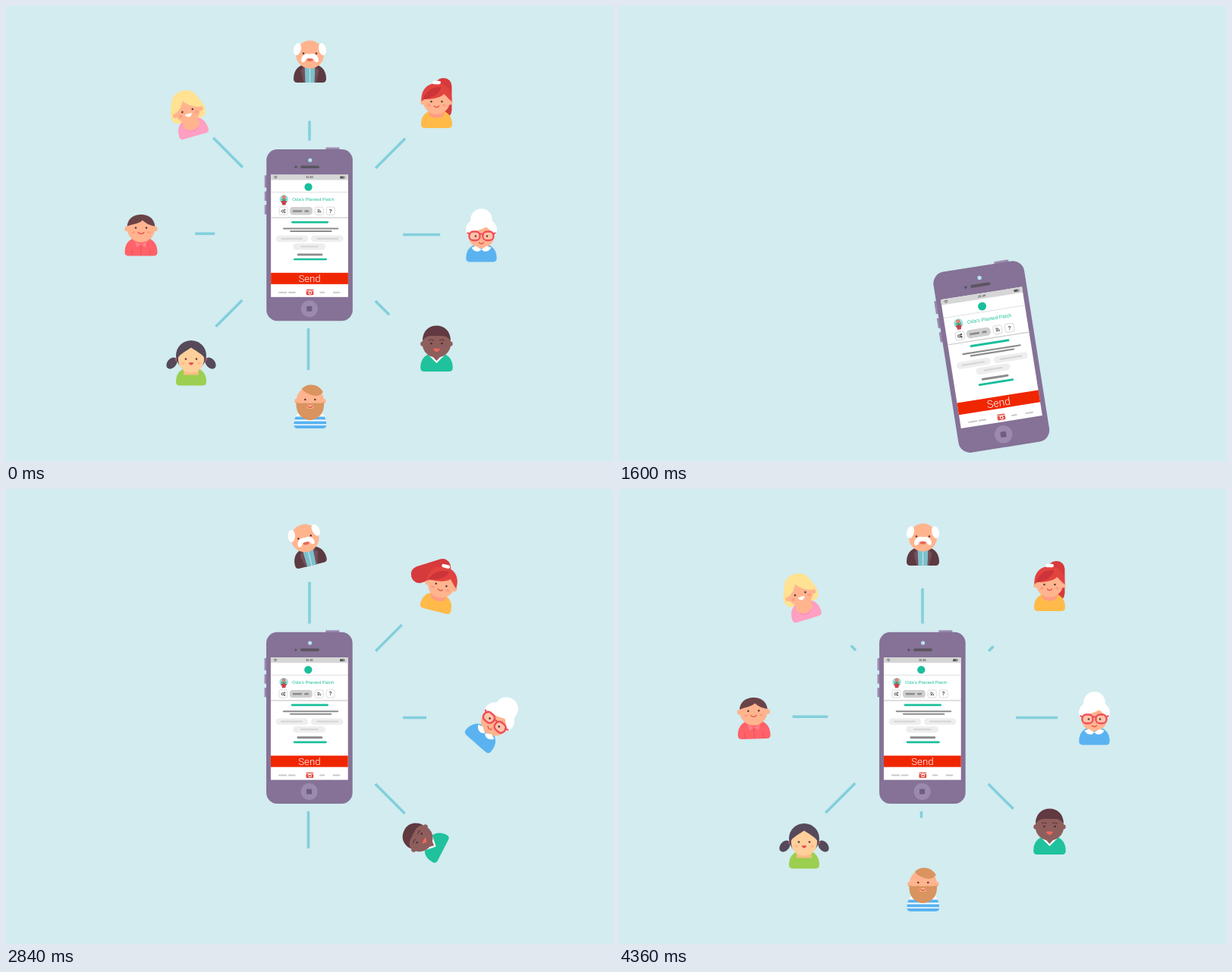
Recreate the animation shown at these times as an HTML page. Size 800 by 600 pixels, loop 4.4 s.

```html
<!DOCTYPE html>
<html lang="en">
<head>
<meta charset="utf-8">
<title>Phone and people</title>
<style>
html, body { margin: 0; width: 100%; height: 100%; overflow: hidden; background: #d2ecf0; }
svg { display: block; width: 800px; height: 600px; }
text { font-family: "Liberation Sans", Arial, sans-serif; }
</style>
</head>
<body>
<svg id="stage" viewBox="0 0 800 600"></svg>
<script>
const LOOP = 4400, STEP = 40, CENTER = [400, 302];

// Drawing helpers
const circle = (x, y, r, fill) => `<circle cx="${x}" cy="${y}" r="${r}" fill="${fill}"/>`;
const oval = (x, y, rx, ry, fill, turn = 0) =>
  `<ellipse cx="${x}" cy="${y}" rx="${rx}" ry="${ry}" fill="${fill}" transform="rotate(${turn} ${x} ${y})"/>`;
const box = (x, y, w, h, fill, r = 0, more = '') =>
  `<rect x="${x}" y="${y}" width="${w}" height="${h}" rx="${r}" fill="${fill}" ${more}/>`;
const path = (d, fill) => `<path d="${d}" fill="${fill}"/>`;
const stroke = (d, color, w = 1) =>
  `<path d="${d}" fill="none" stroke="${color}" stroke-width="${w}" stroke-linecap="round"/>`;
const bar = (x1, x2, y, h, fill) => box(x1, y, x2 - x1, h, fill, h / 2);

// People: origin at the bottom centre of the body
const bodyPath = (w, h) =>
  `M${5 - w} 0Q${-w} 0 ${-w} -5C${-w} ${-h * .72} ${-w * .62} ${-h} 0 ${-h}S${w} ${-h * .72} ${w} -5Q${w} 0 ${w - 5} 0Z`;
const body = (w, h, fill) => path(bodyPath(w, h), fill);
const eyes = (y, d, fill = '#5b3a3c') => circle(-d, y, 1.3, fill) + circle(d, y, 1.3, fill);
const ears = (y, d, fill) => circle(-d, y, 3.2, fill) + circle(d, y, 3.2, fill);
const smile = (y, w, color = '#e0504a') => stroke(`M${-w} ${y}Q0 ${y + w} ${w} ${y}`, color, 1.2);
const grin = (y, w, fill) => path(`M${-w} ${y}Q0 ${y - 1} ${w} ${y}Q0 ${y + w * 1.7} ${-w} ${y}Z`, fill);
const SKIN = '#ffb48e', BLUSH = '#ff9c82', BLUE = '#5ab3f0', TAN = '#d9945f';

const grandpa = body(21.5, 25, '#5d3a42') +
  path('M-8 0L-7 -21H7L8 0Z', '#7cc0cc') + stroke('M0 -18V0', '#b5dfe5', 1.5) +
  path('M-7 -22L-12 -16L-8 0H-6ZM7 -22L12 -16L8 0H6Z', '#74505a') +
  circle(0, -37, 18.5, SKIN) +
  oval(-16.5, -44, 4.8, 8.2, '#fff', 14) + oval(16.5, -44, 4.8, 8.2, '#fff', -14) +
  eyes(-38.5, 8.5) + oval(0, -30.5, 4, 2.5, '#e5695d') +
  path('M-11.5 -29C-11 -37 -5 -39 0 -37.5C5 -39 11 -37 11.5 -29C10 -25 6 -27 5 -31Q0 -33 -5 -31C-6 -27 -10 -25 -11.5 -29Z', '#fff');

const redhead = '<g id="tail">' + box(-11, -6, 22, 53, '#d63a3c', 10.5) + '</g>' +
  body(20.5, 24, '#ffba4a') + path('M-11 -23L-9 -16Q0 -11 9 -16L11 -23Z', BLUSH) +
  ears(-34, 18, SKIN) + circle(0, -36, 17.8, SKIN) +
  path('M-20 -35C-21 -52 -11 -59 0 -59S21 -52 20 -35C16 -38 13 -42 10 -45C4 -39 -8 -38 -16 -38Q-18 -37 -20 -35Z', '#e2433f') +
  path('M-18 -38C-15 -48 -6 -55 6 -54C5 -46 -6 -39 -18 -38Z', '#cc3439') +
  box(-5.5, -62.2, 11, 4.4, '#fff', 2.2) + eyes(-35, 7) +
  oval(-10, -30, 2.5, 1.7, BLUSH) + oval(10, -30, 2.5, 1.7, BLUSH) + smile(-29, 3.2);

const granny = circle(0, -56, 14.3, '#fff') + oval(0, -43, 20.5, 15.5, '#fff') +
  body(20.2, 24, BLUE) + circle(0, -35, 17, SKIN) +
  path('M-18 -36C-18 -48 -8 -53 0 -53S18 -48 18 -36C13 -40 9 -45 6 -46C0 -42 -10 -41 -18 -36Z', '#fff') +
  path('M0 -17C-3 -12 -10 -13 -13 -19L-7 -21Q-3 -18 0 -17ZM0 -17C3 -12 10 -13 13 -19L7 -21Q3 -18 0 -17Z', '#fff') +
  [-9, 9].map(x => `<rect x="${x - 7}" y="-40" width="14" height="11.5" rx="5" fill="#ffc3a7" stroke="#ee4f5b" stroke-width="2.3"/>`).join('') +
  stroke('M-2 -37H2M-18 -38L-15 -37M18 -38L15 -37', '#ee4f5b', 2.2) + eyes(-34, 7.5) + smile(-25.5, 3);

const neighbour = body(21.3, 25, '#1fc29d') + path('M-11 -22L0 -11L11 -22L8 -25H-8Z', '#fff') +
  path('M-8 -23L0 -14L8 -23Z', '#8e5e5c') + ears(-36.5, 18, '#8e5e5c') + circle(0, -37, 18.8, '#8e5e5c') +
  path('M-18.6 -41C-18 -54 -10 -60.5 0 -60.5S18 -54 18.6 -41C15 -45 12 -47 8 -47H-8C-12 -47 -15 -45 -18.6 -41Z', '#613940') +
  stroke('M-10 -41Q-7 -43 -4 -41M4 -41Q7 -43 10 -41', '#613940', 1.2) +
  eyes(-37, 7, '#48282e') + grin(-30, 4.8, '#f0665d');

const sailor = '<clipPath id="shirt"><path d="' + bodyPath(21.5, 25) + '"/></clipPath>' +
  '<g clip-path="url(#shirt)">' + box(-22, -26, 44, 26, '#fff') +
  [-24, -15.5, -9.5, -4].map(y => box(-22, y, 44, 4, BLUE)).join('') + '</g>' +
  ears(-36, 17.5, SKIN) + circle(0, -37, 18, SKIN) +
  path('M-18 -35C-13 -31 -9 -35 0 -33C9 -35 13 -31 18 -35C20 -20 10 -11 0 -11S-20 -20 -18 -35Z', TAN) +
  path('M-11 -52C-5 -60 11 -60 17 -48C13 -42 6 -42 -1 -45Q-7 -47 -11 -52Z', TAN) +
  eyes(-38, 6.5) + oval(0, -28.5, 4.5, 2.6, SKIN) + smile(-29, 3);

const pigtails = oval(-25.5, -29.5, 6, 8.5, '#55495a', 40) + oval(25.5, -29.5, 6, 8.5, '#55495a', -40) +
  stroke('M-20 -34L-17 -36M20 -34L17 -36', '#e8515b', 2.2) +
  circle(0, -39.5, 20, '#55495a') + body(20, 24, '#9ccf4f') +
  path('M-10 -22V-14H10V-22Z', '#f8bd85') +
  path('M-17 -37C-15 -41 -6 -46 0 -50C6 -46 15 -41 17 -37C18 -24 9 -17 0 -17S-18 -24 -17 -37Z', '#ffcf9b') +
  eyes(-35, 7) + grin(-30, 3.6, '#e5504b') +
  oval(-10.5, -29.5, 2.4, 1.6, '#ffb58a') + oval(10.5, -29.5, 2.4, 1.6, '#ffb58a');

const boy = body(21.5, 25, '#ff6269') + ears(-35.5, 18.5, SKIN) + circle(0, -36, 18.2, SKIN) +
  path('M-18.5 -39C-17 -51 -8 -54.5 0 -54.5S17 -51 18.5 -39C12 -40 6 -43 2 -47C-3 -42 -12 -42 -18.5 -39Z', '#6a4348') +
  path('M-8 -19L0 -15L8 -19L6 -11L0 -15L-6 -11Z', '#ff8087') + stroke('M0 -14V-1M-12 -8V-1M12 -8V-1', '#ec4f5b') +
  eyes(-37, 7) + oval(-10, -31, 2.4, 1.6, BLUSH) + oval(10, -31, 2.4, 1.6, BLUSH) + smile(-31, 4);

const blonde = path('M-21 -24C-26 -32 -21 -42 -19 -46C-16 -58 -9 -62 0 -62S16 -58 19 -46C21 -42 26 -32 21 -24C12 -18 -12 -18 -21 -24Z', '#ffe292') +
  body(20, 25, '#ff9fc1') + path('M-10 -25L-11 -14Q0 -3 11 -14L10 -25Z', SKIN) +
  stroke('M-7 -10Q0 -3 7 -10', '#f98db3') + ears(-33, 17.5, SKIN) +
  circle(0, -36, 17, SKIN) +
  path('M-18 -35C-19 -52 -10 -59 0 -59S19 -52 18 -35C9 -37 2 -42 -3 -49C-6 -42 -11 -37 -18 -35Z', '#ffe292') +
  eyes(-35, 7) + grin(-30.5, 5, '#fff') + oval(-11, -30, 2.4, 1.7, BLUSH) + oval(11, -30, 2.4, 1.7, BLUSH);

// Resting place (bottom centre), clockwise from the top
const people = [
  [grandpa, 400.5, 101], [redhead, 567.5, 161], [granny, 626.5, 337.5], [neighbour, 567.5, 482],
  [sailor, 400.8, 557], [pigtails, 244, 500.5], [boy, 178, 329.5], [blonde, 246, 172]
];

// Rays: inner end, direction, cycle time at 0 ms, first and last moment shown
const D = Math.SQRT1_2;
const rays = [
  [400, 177.5, 0, -1, 131, 2469, 469], [487.2, 213.7, D, -D, 480, 2120, 120],
  [523.2, 301.5, 1, 0, 322, 2278, 278], [486.8, 389, D, D, 131, 2469, 469],
  [398.5, 425, 0, 1, 480, 2720, 720], [311.2, 388, -D, D, 322, 2878, 278],
  [275.2, 300.2, -1, 0, 131, 3069, 469], [312, 212.7, -D, -D, 480, 3320, 720]
];

// Phone, drawn large around (400.2, 254.2)
const GREEN = '#1abf9b', GREY = '#8c8c8e', PALE = '#d6d6d8', CASE = '#857296', LIGHT = '#9b8aae';
const key = x => box(x, 204, 15, 14, '#fff', 3, 'stroke="#cfcfd2" stroke-width="1"');
const chip = (x, y, a, b) => box(x, y, 58, 11.6, '#eeeeef', 5.8) + bar(a, b, y + 4.4, 2.8, PALE);
const gear = (x, y, r) => `<circle cx="${x}" cy="${y}" r="${r}" fill="none" stroke="#444" stroke-width="1.3"/>`;
const phone =
  [[147, 22], [176, 17], [200, 17]].map(([y, h]) => box(319.6, y, 5, h, LIGHT, 1)).join('') +
  box(429.5, 97, 24.5, 6, LIGHT, 1) + box(323, 100.4, 154.6, 307.8, CASE, 19.5) +
  circle(401.3, 119.8, 3.5, '#b5e3eb') + circle(375.8, 132, 2.2, '#5b5060') + bar(384, 418, 129.6, 5, '#5b5560') +
  box(331, 146, 138.5, 219.5, '#fff') + box(331, 146, 138.5, 9.5, '#d6d6d6') +
  stroke('M336.5 149.6Q339.3 147.2 342.1 149.6M337.8 151.2Q339.3 149.9 340.8 151.2', '#444', .9) + circle(339.3, 152.4, .7, '#444') +
  '<text x="400.2" y="152.5" font-size="5.2" font-weight="bold" text-anchor="middle" fill="#555">15:45</text>' +
  box(455, 148.8, 8, 4, '#555', .8) + box(463.4, 150, .9, 1.7, '#555') + box(460.7, 149.6, 1.5, 2.4, '#bbb') +
  circle(398.2, 168, 7, GREEN) + box(331, 177, 138.5, 1, PALE) +
  circle(354.3, 190, 7.8, '#9ddbdc') + stroke('M354.3 188V194M354 193L350.5 190M354.6 193L358 190', '#2f9d68', 1.8) +
  circle(354.3, 186.5, 3, '#e9604f') + circle(354.3, 186.5, 1.1, '#ffd6a0') +
  path('M349.3 193H359.3V195.3H358.3L357.2 200.5H351.4L350.3 195.3H349.3Z', '#c8434b') +
  `<text x="369.3" y="193.3" font-size="8.3" fill="${GREEN}">Oda's Planted Patch</text>` +
  key(346) + gear(352, 211.4, 2) + gear(355.8, 209, 1) + gear(355.8, 213.4, 1) +
  box(365, 204, 40.5, 14, '#cfcfd0', 5.5) + bar(370, 387, 209.5, 3.5, GREY) + bar(391, 399.2, 209.5, 3.5, GREY) +
  key(410.2) + circle(415.8, 213, 1, '#444') + stroke('M415.2 210.4A3.2 3.2 0 0 1 418.4 213.6M415.2 208.2A5.4 5.4 0 0 1 420.6 213.6', '#444', 1.2) +
  key(430.5) + '<text x="438" y="214.3" font-size="9" font-weight="bold" text-anchor="middle" fill="#444">?</text>' +
  box(331, 222.2, 138.5, 1.8, '#cfcfd0') +
  bar(367.5, 434.5, 229.3, 3.8, GREEN) + bar(352.5, 452.5, 241.2, 2.8, GREY) + bar(365, 440.5, 246, 2.8, GREY) +
  chip(340, 255, 349, 388) + chip(403, 255, 413, 452) + chip(371, 269.2, 384, 416.5) +
  bar(378, 424, 287.6, 3.8, GREY) + bar(371.5, 431.5, 296, 3.6, GREEN) +
  box(331, 322, 138.5, 20.4, '#f02600') +
  '<text x="400.3" y="338.9" font-size="18" text-anchor="middle" fill="#fff" style="font-family:Roboto,Lato,sans-serif;font-weight:300">Send</text>' +
  [[344.5, 360], [362, 375.5], [418, 428], [442, 455.5]].map(([a, b]) => bar(a, b, 356, 2.6, '#c9c9ce')).join('') +
  box(394.3, 352, 13.2, 10, '#e34c43', 1.5) + box(394.3, 354, 13.2, 1.2, '#fff') +
  circle(401.3, 358, 3.1, '#fff') + circle(401.3, 358, 1.8, '#e34c43') +
  circle(400, 386.5, 15, LIGHT) + box(395, 381.8, 9.8, 9.6, '#6f5d82', 2);

const stage = document.getElementById('stage');
stage.innerHTML = box(0, 0, 800, 600, '#d2ecf0') +
  people.map(p => `<g class="person">${p[0]}</g>`).join('') +
  rays.map(() => '<line class="ray" stroke="#82cfdc" stroke-width="3.5"/>').join('') +
  `<g id="phone">${phone}</g>`;
const figures = stage.querySelectorAll('.person'), beams = stage.querySelectorAll('.ray');
const handset = document.getElementById('phone'), tail = document.getElementById('tail');

// Smooth curve through rows of [time, ...values]
function along(rows, t) {
  const last = rows.length - 1;
  if (t <= rows[0][0]) return rows[0].slice(1);
  if (t >= rows[last][0]) return rows[last].slice(1);
  const i = rows.findIndex(r => r[0] > t) - 1, a = rows[i], b = rows[i + 1];
  const span = b[0] - a[0], u = (t - a[0]) / span;
  const slope = (k, c) => {
    const p = rows[Math.max(k - 1, 0)], n = rows[Math.min(k + 1, last)];
    return k === last ? 0 : (n[c] - p[c]) / (n[0] - p[0]) * span;
  };
  return a.slice(1).map((v, j) => {
    const c = j + 1, gap = b[c] - v, m = slope(i, c), n = slope(i + 1, c);
    return v + u * (m + u * (3 * gap - 2 * m - n + u * (m + n - 2 * gap)));
  });
}
const clamp = u => Math.min(1, Math.max(0, u));

// Age, turn, scale
const POP = [[0, -200, 0], [120, -114, .7], [160, -63, .95], [240, -8, 1.04], [320, 31, 1.08], [390, 43, 1.08],
  [520, 21, 1.02], [720, -11, 1], [920, -16, 1], [1120, 0, 1]];
// Age, turn, sideways shift
const SWING = [[0, 100, 0], [160, 92, 0], [520, 62, 0], [920, 30, 0], [1250, 0, 9]];
// Time, x, y, turn, scale
const RETURN = [[1360, 622, 790, -27, 1.15], [1400, 600, 720, -24, 1.14], [1520, 532, 548, -15, 1.1],
  [1600, 490.7, 462.5, -9, 1.066], [1680, 453, 395, -5, 1.04], [1800, 417, 337, -1.5, 1.01],
  [1920, 404, 309, -.3, 1], [2080, 399.8, 301.8, 0, 1]];

function phonePose(t) {
  if (t >= 1360) return along(RETURN, t);
  const u = clamp((t - 440) / 584), lift = Math.max(0, (t - 965) / 115);
  return [400, 302 - 48 * lift * lift, 0, 1 + .361 * u * u * (3 - 2 * u)];
}

function draw(t) {
  const [px, py, turn, size] = phonePose(t);
  handset.setAttribute('transform',
    `translate(${px} ${py}) rotate(${turn}) scale(${size / 1.361}) translate(-400.2 -254.2)`);

  const leaving = t < 1200;
  people.forEach(([, x, y], i) => {
    const age = t - 2080 - 200 * i + (leaving ? LOOP : 0);
    const u = leaving ? clamp((t - 180 - 40 * i) / 450) : 0, pull = u * u;
    const [rot, scale] = along(POP, age);
    const cx = x + pull * (CENTER[0] - x), cy = y + pull * (CENTER[1] - y + 28);
    figures[i].style.display = age > 0 && u < 1 ? '' : 'none';
    figures[i].setAttribute('transform',
      `translate(${cx} ${cy - 10}) rotate(${rot}) scale(${scale}) translate(0 10)`);
    if (i === 1) {
      const [swing, shift] = along(SWING, age);
      tail.setAttribute('transform', `translate(0 -60) rotate(${swing}) translate(${shift} 0)`);
    }
  });

  rays.forEach(([x, y, dx, dy, phase, from, until], i) => {
    const u = clamp((t + phase + 600) % 600 / 480), rest = 1 - u;
    const length = t < until || t >= from ? 55 * (1 - rest * rest) : 0;
    const spot = { x1: x, y1: y, x2: x + dx * length, y2: y + dy * length };
    for (const name in spot) beams[i].setAttribute(name, spot[name]);
    beams[i].style.display = length ? '' : 'none';
  });
}

const start = performance.now();
function tick() {
  const t = (performance.now() - start) % LOOP;
  draw(Math.floor(t / STEP) * STEP);
  requestAnimationFrame(tick);
}
tick();
</script>
</body>
</html>
```
